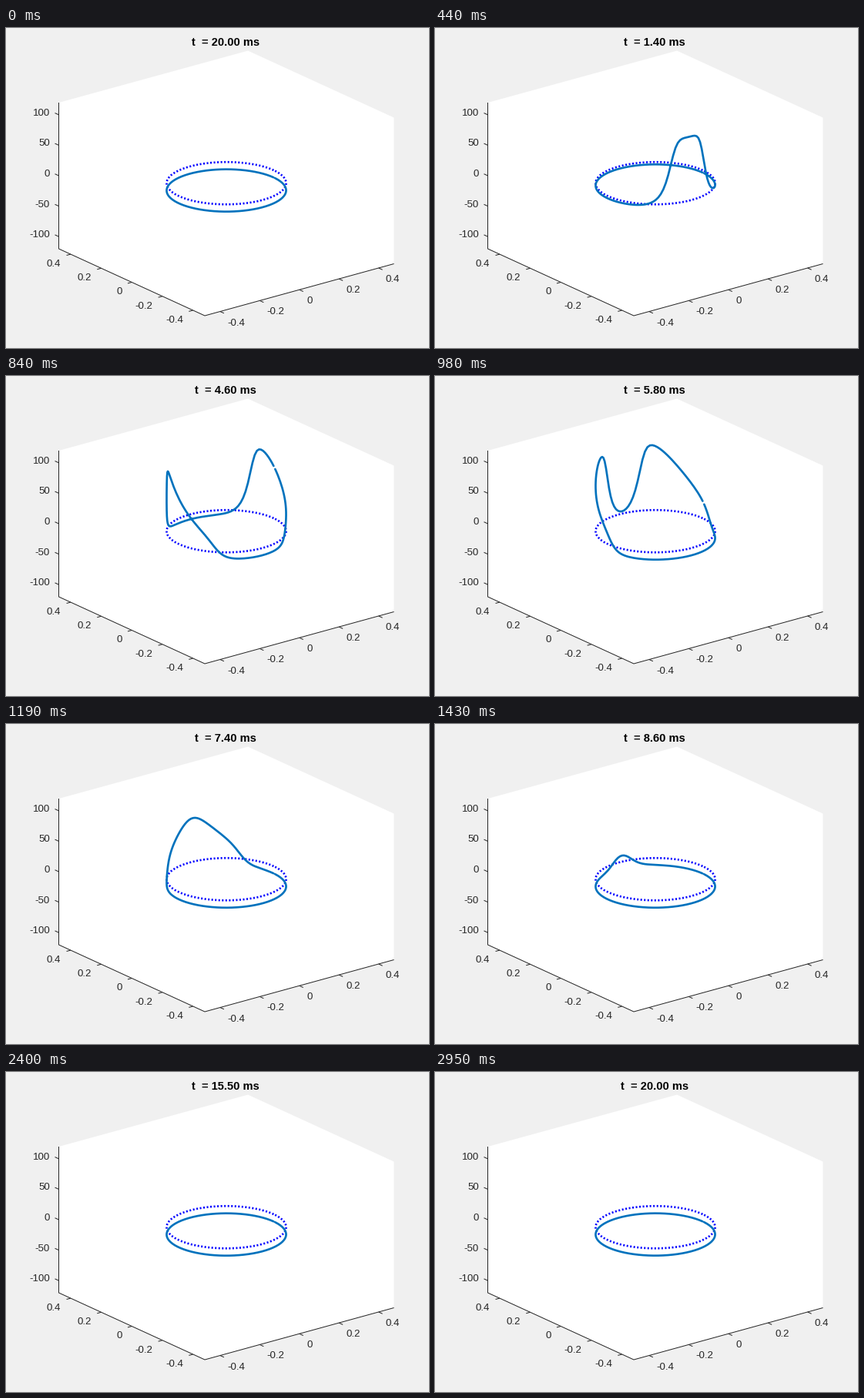
These frames come from a looping animation (549 px wide and 416 px high, 2970 ms). A matplotlib script:

```python
import numpy as np
import matplotlib.pyplot as plt
from matplotlib.animation import FuncAnimation

W, H, DPI = 549, 416, 128
PX = 72 / DPI                      # one pixel in points
LOOP, TICK = 2970, 10              # ms

# Ring-shaped axon
N = 150
DX = 0.01                          # cm
RADIUS = N * DX / (2 * np.pi)
HALF = 2 * RADIUS                  # x and y limits
Z_HALF = 120                       # mV
SITE = 111                         # stimulated node
DT = 0.005                         # ms
ANGLE = np.arange(N) * 2 * np.pi / N

# Screen positions of the box
LEFT = np.array([68, 286.5])
FRONT = np.array([257.5, 373.5])
RIGHT = np.array([503, 306])
UP = np.array([0, -190])
CENTER = (LEFT + RIGHT + UP) / 2
EX = (RIGHT - FRONT) / (2 * HALF)
EY = (LEFT - FRONT) / (2 * HALF)
EZ = UP / (2 * Z_HALF)


def project(x, y, z):
    return [CENTER[i] + x * EX[i] + y * EY[i] + z * EZ[i] for i in (0, 1)]


def ratio(x):
    x = x + 1e-9
    return x / np.expm1(x)


def rates(v):
    """Opening and closing rates of the m, h and n gates."""
    return ((ratio((25 - v) / 10), 4 * np.exp(-v / 18)),
            (0.07 * np.exp(-v / 20), 1 / (np.exp((30 - v) / 10) + 1)),
            (0.1 * ratio((10 - v) / 10), 0.125 * np.exp(-v / 80)))


def simulate(diffusion, current, duration):
    """Membrane potential of every node at every time step."""
    v = np.zeros(N)
    gates = [a / (a + b) for a, b in rates(v)]
    stim = np.where(abs(np.arange(N) - SITE) <= 5, current, 0.0)
    spread = diffusion / DX ** 2
    steps = int(round(duration / DT))
    history = np.empty((steps + 1, N))
    history[0] = v
    for i in range(steps):
        gates = [g + DT * (a * (1 - g) - b * g)
                 for g, (a, b) in zip(gates, rates(v))]
        m, h, n = gates
        flow = 120 * m ** 3 * h * (115 - v) - 36 * n ** 4 * (v + 12)
        flow += spread * (np.roll(v, 1) + np.roll(v, -1) - 2 * v)
        if i * DT < 1:
            flow += stim
        v = v + DT * flow
        history[i + 1] = v
    return history


def tune(first=3.52, second=5.92):
    """Match the times at which the spike peaks 32 and 64 nodes away."""
    diffusion, current = 0.0042, 80.0
    for _ in range(8):
        run = simulate(diffusion, current, 7.5)
        t1, t2 = (DT * np.argmax(run[:, SITE - d]) for d in (32, 64))
        speedup = np.clip((t2 - t1) / (second - first), 0.85, 1.2) ** 2
        diffusion = np.clip(diffusion * speedup, 0.002, 0.008)
        late = t1 - first - (t2 - t1 - second + first)
        current = np.clip(current * np.exp(np.clip(1.5 * late, -0.4, 0.4)),
                          35, 300)
    return diffusion, current


potential = simulate(*tune(), 20)

# Runs of picture changes: first time, last time, count
RUNS = [(280, 780, 21), (810, 980, 8), (1010, 1190, 8), (1210, 1270, 3),
        (1370, 1740, 15), (1760, 1880, 6), (1910, 2400, 17),
        (2420, 2420, 1), (2450, 2950, 21)]
changes = np.concatenate([np.linspace(*run) for run in RUNS])


def clock(frame):
    """Simulated time shown in a frame, in ms."""
    step = np.searchsorted(changes, frame * TICK + 1e-6, side="right")
    if step == 0:
        return 20.0
    return 0.2 * step - (0.1 if 62 <= step < 80 else 0)


fig = plt.figure(figsize=(W / DPI, H / DPI), dpi=DPI, facecolor="#f0f0f0")
ax = fig.add_axes([0, 0, 1, 1])
ax.set_xlim(-0.5, W - 0.5)
ax.set_ylim(H - 0.5, -0.5)
ax.axis("off")
plt.rcParams["font.family"] = "Liberation Sans"

INK = "#262626"


def line(*points):
    ax.plot(*np.array(points).T, color=INK, lw=PX, solid_capstyle="butt")


def label(value, x, y, align):
    ax.text(x, y + 4, f"{value:g}", color=INK, size=13.33 * PX,
            ha=align, va="baseline")


def tick(point, direction, value, offset, align):
    line(point, point + 5.5 * direction / np.hypot(*direction))
    label(value, *(point + offset), align)


back = LEFT + RIGHT - FRONT
ax.fill(*np.array([LEFT, LEFT + UP, back + UP, RIGHT + UP, RIGHT, FRONT]).T,
        color="white", lw=0)
line(LEFT + UP, LEFT, FRONT, RIGHT)

for value in (-0.4, -0.2, 0, 0.2, 0.4):
    middle_x, middle_y = (FRONT + RIGHT) / 2, (FRONT + LEFT) / 2
    tick(middle_x + value * EX, -EY, value, (9.3, 14), "left")
    tick(middle_y + value * EY, -EX, value, (-12.5, 12), "right")
for value in (-100, -50, 0, 50, 100):
    tick(LEFT + UP / 2 + value * EZ, EY, value, (-11.5, -3), "right")

ring_x, ring_y = RADIUS * np.cos(ANGLE), RADIUS * np.sin(ANGLE)
ax.plot(*project(np.append(ring_x, ring_x[0]), np.append(ring_y, ring_y[0]), 0),
        color="#0000ff", lw=2.67 * PX, ls=(0, (0.75, 0.95)),
        dash_capstyle="butt")
wave, = ax.plot([], [], color="#0072bd", lw=2.67 * PX,
                solid_capstyle="round", solid_joinstyle="round")
title = ax.text(284.8, 22.2, "", size=14.67 * PX, weight="bold",
                ha="center", va="baseline", color="black")


def update(frame):
    t = clock(frame)
    wave.set_data(*project(ring_x, ring_y, potential[int(round(t / DT))]))
    title.set_text(f"t  = {t:.2f} ms")
    return wave, title


anim = FuncAnimation(fig, update, frames=LOOP // TICK, interval=TICK,
                     repeat=True, repeat_delay=0)
plt.show()
```
